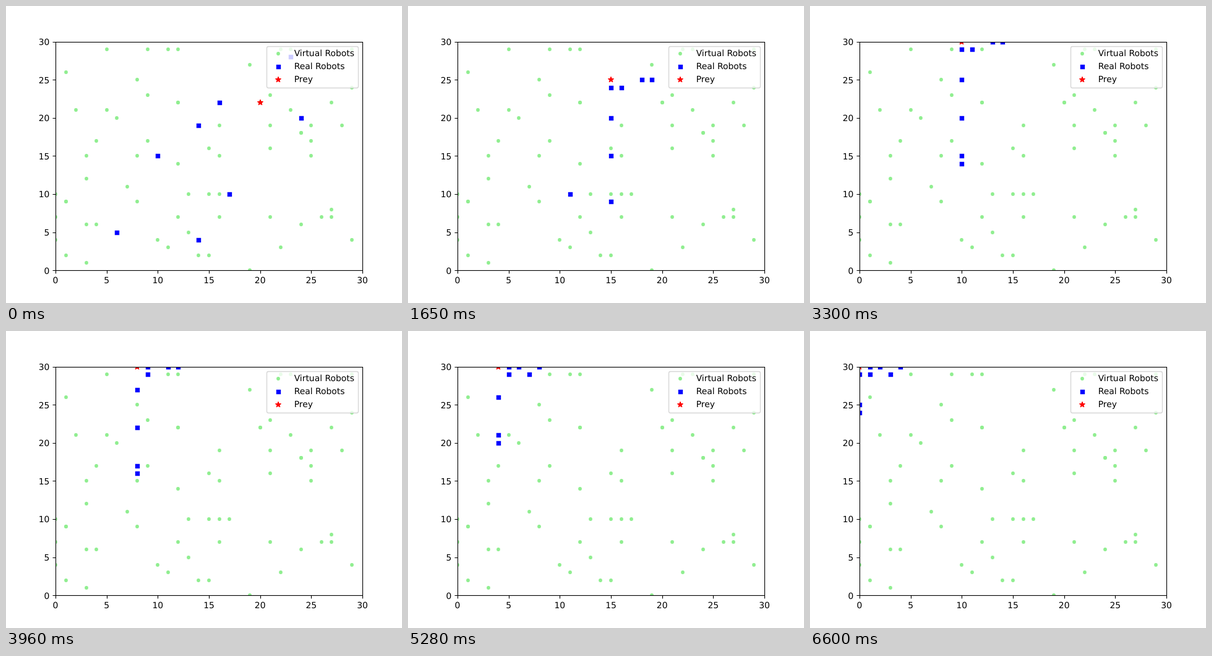
Write an HTML page that moves like this. It is 640 px wide and 480 px high and loops after 8590 ms.

```html
<!DOCTYPE html>
<html lang="en">
<head>
<meta charset="utf-8">
<title>Robots chasing prey</title>
<style>
  html, body { margin: 0; width: 100%; height: 100%; overflow: hidden; background: #fff; }
  svg { display: block; width: 640px; height: 480px; }
  text { font: 13.889px "DejaVu Sans", sans-serif; text-rendering: geometricPrecision; }
  .axis { fill: none; stroke: #000; stroke-width: 1.11; }
  .dot { fill: #90ee90; }
  .robot, .prey { stroke-width: 1.39; }
  .robot { fill: #00f; stroke: #00f; }
  .prey { fill: #f00; stroke: #f00; stroke-linejoin: round; }
  .legend { fill: #fff; stroke: #ccc; stroke-width: 1.39; fill-opacity: .8; stroke-opacity: .8; }
</style>
</head>
<body>
<svg viewBox="0 0 640 480">
  <clipPath id="plot"><rect x="80" y="58" width="496" height="369"/></clipPath>
  <g id="field" clip-path="url(#plot)"></g>
  <g id="axes"></g>
  <g id="key"></g>
</svg>
<script>
const STEP = 330, LAST = 20, LOOP = 8590;

// Grid row -> columns holding a virtual robot (repeats are stacked dots).
const DOTS = {
  29: [5, 9, 11, 12, 22, 23, 29], 27: [19], 26: [1], 25: [8], 24: [29],
  23: [9, 21], 22: [12, 12, 20, 20, 27], 21: [2, 5, 23], 20: [6],
  19: [16, 21, 25, 28], 18: [24, 24], 17: [4, 9, 25], 16: [15, 21],
  15: [3, 8, 16, 25], 14: [12], 12: [3], 11: [7], 10: [0, 13, 15, 16, 17],
  9: [1, 1, 8], 8: [27], 7: [0, 12, 16, 21, 26, 27], 6: [3, 4, 24],
  5: [13], 4: [0, 10, 29], 3: [11, 22], 2: [1, 14, 15], 1: [3], 0: [19]
};

// Waypoints: [step, column, row]
const PREY = [[0, 20, 22], [2, 18, 22], [10, 10, 30], [20, 0, 30]];
const ROBOTS = [
  [[0, 24, 20], [10, 14, 30], [20, 4, 30]],
  [[0, 23, 28], [4, 19, 24], [10, 13, 30], [15, 8, 30], [16, 7, 29], [20, 3, 29]],
  [[0, 16, 22], [1, 17, 22], [3, 17, 22], [10, 10, 29], [11, 10, 29], [12, 9, 30], [20, 1, 30]],
  [[0, 14, 19], [2, 16, 21], [3, 16, 22], [4, 17, 23], [10, 11, 29], [11, 10, 30],
   [12, 9, 29], [14, 7, 29], [15, 7, 30], [20, 2, 30]],
  [[0, 10, 15], [5, 15, 20], [14, 6, 29], [15, 6, 29], [20, 1, 29]],
  [[0, 17, 10], [1, 18, 11], [2, 18, 12], [19, 1, 29], [20, 0, 29]],
  [[0, 6, 5], [7, 13, 12], [20, 0, 25]],
  [[0, 14, 4], [3, 17, 7], [20, 0, 24]]
];

const px = col => 80 + col * 496 / 30;
const py = row => 427.2 - row * 12.32;
const [field, axes, key] = ["field", "axes", "key"].map(id => document.getElementById(id));

function add(parent, tag, attrs, text = "") {
  const el = document.createElementNS("http://www.w3.org/2000/svg", tag);
  for (const name in attrs) el.setAttribute(name, attrs[name]);
  el.textContent = text;
  return parent.appendChild(el);
}

function place(el, x, y) {
  el.setAttribute("transform", `translate(${Math.round(x)} ${Math.round(y)})`);
  return el;
}

const starPoints = Array.from({ length: 10 }, (_, i) => {
  const r = i % 2 ? 4.39 * 0.382 : 4.39, a = i * Math.PI / 5;
  return `${(r * Math.sin(a)).toFixed(3)},${(-r * Math.cos(a)).toFixed(3)}`;
}).join(" ");

const dot = parent => add(parent, "circle", { class: "dot", r: 2.89 });
const robot = parent => add(parent, "rect", { class: "robot", x: -2.5, y: -2.5, width: 6, height: 6 });
const star = parent => add(parent, "polygon", { class: "prey", points: starPoints });

for (const row in DOTS)
  for (const col of DOTS[row]) place(dot(field), px(col), py(row));

const movers = [...ROBOTS.map(path => ({ path, el: robot(field) })), { path: PREY, el: star(field) }];

add(axes, "rect", { class: "axis", x: 80.5, y: 58.5, width: 496, height: 369 });
for (let v = 0; v <= 30; v += 5) {
  const x = Math.round(px(v)) + 0.5, y = Math.round(py(v)) + 0.5;
  add(axes, "path", { class: "axis", d: `M${x} 427.5v5M80.5 ${y}h-5` });
  add(axes, "text", { x: px(v), y: 448, "text-anchor": "middle" }, v);
  add(axes, "text", { x: 70.3, y: Math.round(py(v) + 5.31), "text-anchor": "end" }, v);
}

add(key, "rect", { class: "legend", x: 421.5, y: 65.5, width: 148, height: 67, rx: 2.78 });
[[dot, "Virtual Robots"], [robot, "Real Robots"], [star, "Prey"]].forEach(([mark, label], i) => {
  place(mark(key), 440, 77 + 21 * i);
  add(key, "text", { x: 465.7, y: 81 + 21 * i }, label);
});

function at(path, step) {
  const i = Math.max(1, path.findIndex(p => p[0] >= step));
  const [s0, x0, y0] = path[i - 1], [s1, x1, y1] = path[i];
  const k = (step - s0) / (s1 - s0);
  return [x0 + (x1 - x0) * k, y0 + (y1 - y0) * k];
}

function draw() {
  const step = Math.min(LAST, Math.floor(performance.now() % LOOP / STEP));
  for (const { path, el } of movers) {
    const [col, row] = at(path, step);
    place(el, px(col), py(row));
  }
  requestAnimationFrame(draw);
}
draw();
</script>
</body>
</html>
```
